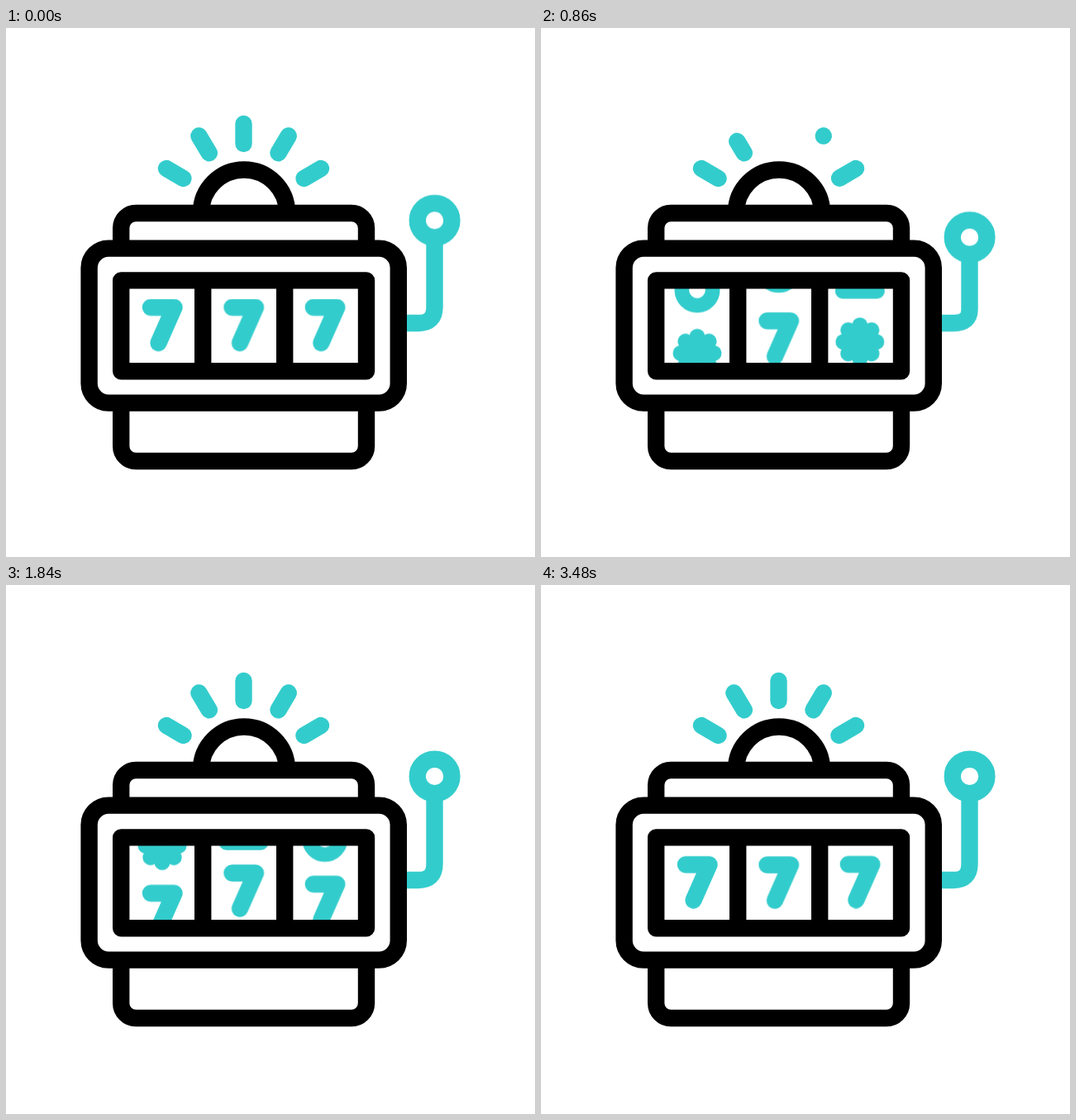
Recreate the animation shown at these times as an HTML page without scripts. Size 640 by 640 pixels, loop 3.6 s.

```html
<!DOCTYPE html>
<html lang="en">
<head>
<meta charset="utf-8">
<title>Slot machine</title>
<style>
  html, body { margin: 0; height: 100%; overflow: hidden; background: #fff; }
  svg { display: block; width: 100vw; height: 100vh; }

  .line { fill: none; stroke: #000; stroke-width: 20.4; }
  .teal { fill: none; stroke: #33cccc; stroke-width: 20.4; stroke-linecap: round; stroke-linejoin: round; }

  .stem, .ball, .strip, .ray { animation: 3600ms linear infinite; }

  /* Lever: pulled down, then swings back with a long settle */
  .stem { animation-name: stem; transform-origin: 0 357px; stroke-linecap: butt; vector-effect: non-scaling-stroke; }
  .ball { animation-name: ball; fill: #fff; }
  @keyframes stem {
    0% { transform: scaleY(1); animation-timing-function: cubic-bezier(.33, 0, .67, 1); }
    11.11% { transform: scaleY(-1.02); animation-timing-function: cubic-bezier(.31, 0, 0, 1); }
    33.33%, 100% { transform: scaleY(1); }
  }
  @keyframes ball {
    0% { transform: translateY(0); animation-timing-function: cubic-bezier(.33, 0, .67, 1); }
    11.11% { transform: translateY(253.5px); animation-timing-function: cubic-bezier(.31, 0, 0, 1); }
    33.33%, 100% { transform: translateY(0); }
  }

  /* Rays: each fades outward and regrows from the dome, twice, in a wave */
  .ray {
    --out: -1; --gap: 2;
    animation-name: ray;
    animation-timing-function: cubic-bezier(.33, 0, .67, 1);
    animation-delay: calc(var(--i) * 111ms);
    stroke-dasharray: 1 3;
  }
  .first { --out: .97; --gap: .97; }
  @keyframes ray {
    0%, 11.22% { stroke-dashoffset: 0; }
    14.83% { stroke-dashoffset: var(--out); }
    14.84%, 18.21% { stroke-dashoffset: var(--gap); }
    18.22% { stroke-dashoffset: 1; }
    22.39%, 25.94% { stroke-dashoffset: 0; }
    29.55% { stroke-dashoffset: var(--out); }
    29.56%, 32.93% { stroke-dashoffset: var(--gap); }
    32.94% { stroke-dashoffset: 1; }
    37.11%, 100% { stroke-dashoffset: 0; }
  }

  /* Reels: the strips run upward and coast to the last seven */
  .left { animation-name: left; }
  .middle { animation-name: middle; }
  .right { animation-name: right; }
  @keyframes left {
    0% { transform: translateY(0); }
    11.11% { transform: translateY(0); animation-timing-function: cubic-bezier(.33, 0, .67, .23); }
    16.67% { transform: translateY(-26px); animation-timing-function: cubic-bezier(.33, .26, .67, .74); }
    30.56% { transform: translateY(-217px); animation-timing-function: cubic-bezier(.33, .42, .67, .72); }
    38.33% { transform: translateY(-284px); animation-timing-function: cubic-bezier(.33, .39, .67, .8); }
    51.11% { transform: translateY(-362px); animation-timing-function: cubic-bezier(.33, .87, .67, .95); }
    75% { transform: translateY(-395px); animation-timing-function: cubic-bezier(.33, .6, .67, 1); }
    96.67%, 100% { transform: translateY(-396.7px); }
  }
  @keyframes middle {
    0% { transform: translateY(0); }
    11.11% { transform: translateY(0); animation-timing-function: cubic-bezier(.33, 0, .67, 0); }
    16.67% { transform: translateY(-20px); animation-timing-function: cubic-bezier(.33, .17, .67, .6); }
    30.56% { transform: translateY(-319px); animation-timing-function: cubic-bezier(.33, .33, .67, .7); }
    38.33% { transform: translateY(-520.5px); animation-timing-function: cubic-bezier(.33, .49, .67, .99); }
    51.11% { transform: translateY(-724.5px); animation-timing-function: cubic-bezier(.33, .6, .67, .58); }
    75% { transform: translateY(-730px); animation-timing-function: cubic-bezier(.33, .42, .67, 1); }
    96.67%, 100% { transform: translateY(-734.4px); }
  }
  @keyframes right {
    0% { transform: translateY(0); }
    11.11% { transform: translateY(0); animation-timing-function: cubic-bezier(.33, 0, .67, .23); }
    16.67% { transform: translateY(-31px); animation-timing-function: cubic-bezier(.33, .26, .67, .64); }
    30.56% { transform: translateY(-261.5px); animation-timing-function: cubic-bezier(.33, .34, .67, .71); }
    38.33% { transform: translateY(-397px); animation-timing-function: cubic-bezier(.33, .48, .67, .92); }
    51.11% { transform: translateY(-532px); animation-timing-function: cubic-bezier(.33, .93, .67, .93); }
    75% { transform: translateY(-553.5px); animation-timing-function: cubic-bezier(.33, .57, .67, 1); }
    96.67%, 100% { transform: translateY(-556px); }
  }
</style>
</head>
<body>
<svg viewBox="0 0 640 640" xmlns="http://www.w3.org/2000/svg">
  <defs>
    <path id="seven" class="teal" d="M-14-21.5H14.5L-4.5 21.5"/>
    <circle id="ring" class="teal" r="18.7" style="stroke-width:17.6"/>
    <path id="tri" class="teal" d="M0-18.5L21 18.7H-21Z" style="stroke-width:18"/>
    <g id="flower" fill="#33cccc">
      <circle r="22"/>
      <g id="petals"><circle cx="20" r="9.5"/><circle cx="-20" r="9.5"/><circle cy="20" r="9.5"/><circle cy="-20" r="9.5"/></g>
      <use href="#petals" transform="rotate(45)"/>
    </g>
    <clipPath id="window"><rect x="145" y="310" width="286" height="100"/></clipPath>
  </defs>

  <g class="teal">
    <path class="teal ray first" style="--i:0" pathLength="1" d="M214.5 182L194 170"/>
    <path class="teal ray" style="--i:1" pathLength="1" d="M245.8 151.3L233.4 130.5"/>
    <path class="teal ray" style="--i:2" pathLength="1" d="M287.5 140V116"/>
    <path class="teal ray" style="--i:3" pathLength="1" d="M329.5 151.3L341.8 130.5"/>
    <path class="teal ray" style="--i:4" pathLength="1" d="M360.5 182L381 170"/>
  </g>

  <path class="teal stem" d="M475 357H499Q518.5 357 518.5 337.5V231.5"/>
  <circle class="teal ball" cx="518.6" cy="231.5" r="20.8"/>

  <g clip-path="url(#window)">
    <g transform="translate(189 359.5)"><g class="strip left">
      <use href="#seven"/><use href="#ring" y="83.5"/><use href="#flower" y="160"/>
      <use href="#seven" y="241"/><use href="#flower" y="318"/><use href="#seven" y="397"/>
    </g></g>
    <g transform="translate(287.5 359.5)"><g class="strip middle">
      <use href="#seven"/><use href="#ring" y="84"/><use href="#seven" y="167"/>
      <use href="#flower" y="250"/><use href="#ring" y="332.5"/><use href="#tri" y="415"/>
      <use href="#ring" y="497"/><use href="#flower" y="579.5"/><use href="#tri" y="658"/>
      <use href="#seven" y="735"/>
    </g></g>
    <g transform="translate(385.8 359.5)"><g class="strip right">
      <use href="#seven"/><use href="#tri" y="83"/><use href="#flower" y="163"/>
      <use href="#ring" y="243"/><use href="#seven" y="326"/><use href="#tri" y="403"/>
      <use href="#ring" y="480"/><use href="#seven" y="556"/>
    </g></g>
  </g>

  <g class="line">
    <path d="M236 223.5a52 52 0 0 1 104 0"/>
    <path d="M139.2 262V242a18 18 0 0 1 18-18H418a18 18 0 0 1 18 18V262"/>
    <path d="M139.2 458V506a18 18 0 0 0 18 18H418a18 18 0 0 0 18-18V458"/>
    <rect x="100.6" y="266.6" width="374.2" height="187" rx="23.5"/>
    <path stroke-linejoin="round" d="M139.2 305.4H436V415.3H139.2ZM238.2 305V415M337.2 305V415"/>
  </g>
</svg>
</body>
</html>
```
